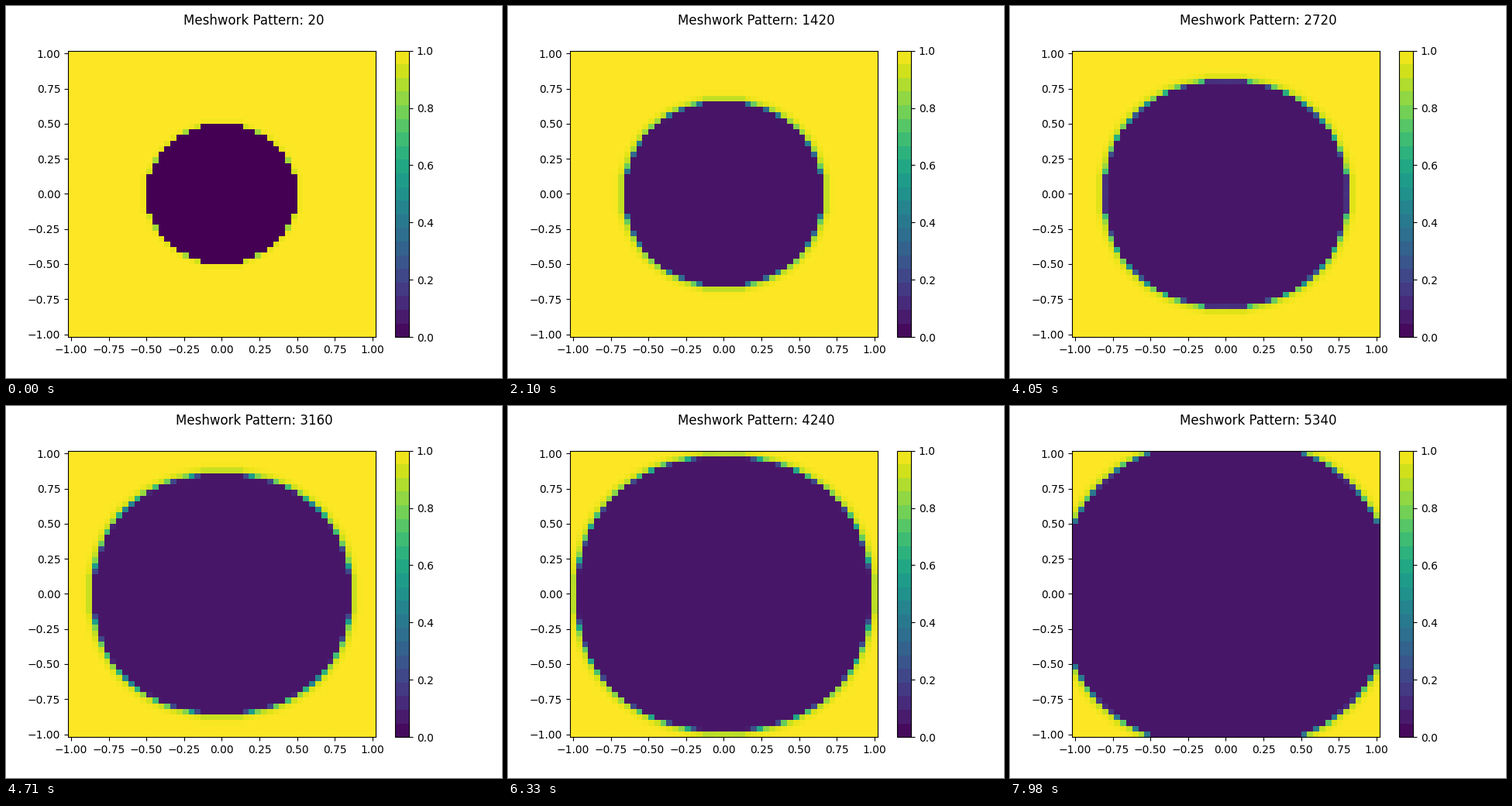
A matplotlib script that plays this animation: 640 px wide and 480 px high, repeating every 8 s.

```python
import numpy as np
import matplotlib.pyplot as plt
from matplotlib.animation import FuncAnimation
from matplotlib.cm import ScalarMappable
from matplotlib.colors import ListedColormap

LOOP_MS = 8000
FRAMES = 267
STEP = 20               # simulation steps per frame
START_RADIUS = 0.5
SPEED = 1.14e-4         # front advance per step
DIAGONAL_GAIN = 0.055   # the front runs faster off the grid axes
FACET = 0.14            # half-width of the flat sides of the disc
REST = 0.058            # level left behind the front
BANDS = 21

axis = np.linspace(-1, 1, 51)
X, Y = np.meshgrid(axis, axis)
seed = np.hypot(X, Y) < START_RADIUS
diagonal = np.sin(2 * np.arctan2(Y, X)) ** 2

# Distance from the centre, with the sides near the axes kept almost straight
far = np.maximum(abs(X), abs(Y))
near = np.minimum(abs(X), abs(Y))
radius = np.hypot(far, np.where(near < FACET, near / 3, near))


def field(n):
    """Substrate level on the grid after n steps."""
    growth = SPEED * n * (1 + DIAGONAL_GAIN * diagonal)
    d = radius - START_RADIUS - 0.001 - growth
    # Consumption: a long weak tail ahead of a steep front
    load = 0.25 * np.exp(-56 * d) + 0.35 * np.exp(-250 * d)
    full = 1 / (REST * (1 - np.exp(-n / 500))) - 1
    onset = 1 - np.exp(-n / 100)
    load = np.where(seed, full, onset * np.minimum(load, full))
    return 1 / (1 + load)


viridis = plt.get_cmap("viridis")
banded = ListedColormap(viridis((np.arange(BANDS) + 0.5) / BANDS))

fig, ax = plt.subplots(figsize=(6.4, 4.8), dpi=100)
mesh = ax.pcolormesh(X, Y, field(STEP), cmap=viridis,
                     vmin=0, vmax=1, shading="nearest")
fig.colorbar(ScalarMappable(cmap=banded), ax=ax)
title = fig.suptitle("")


def update(i):
    n = STEP * (i + 1)
    mesh.set_array(field(n))
    title.set_text(f"Meshwork Pattern: {n}")
    return mesh, title


anim = FuncAnimation(fig, update, frames=FRAMES, interval=LOOP_MS / FRAMES,
                     repeat=True, repeat_delay=0, blit=False)
plt.show()
```
